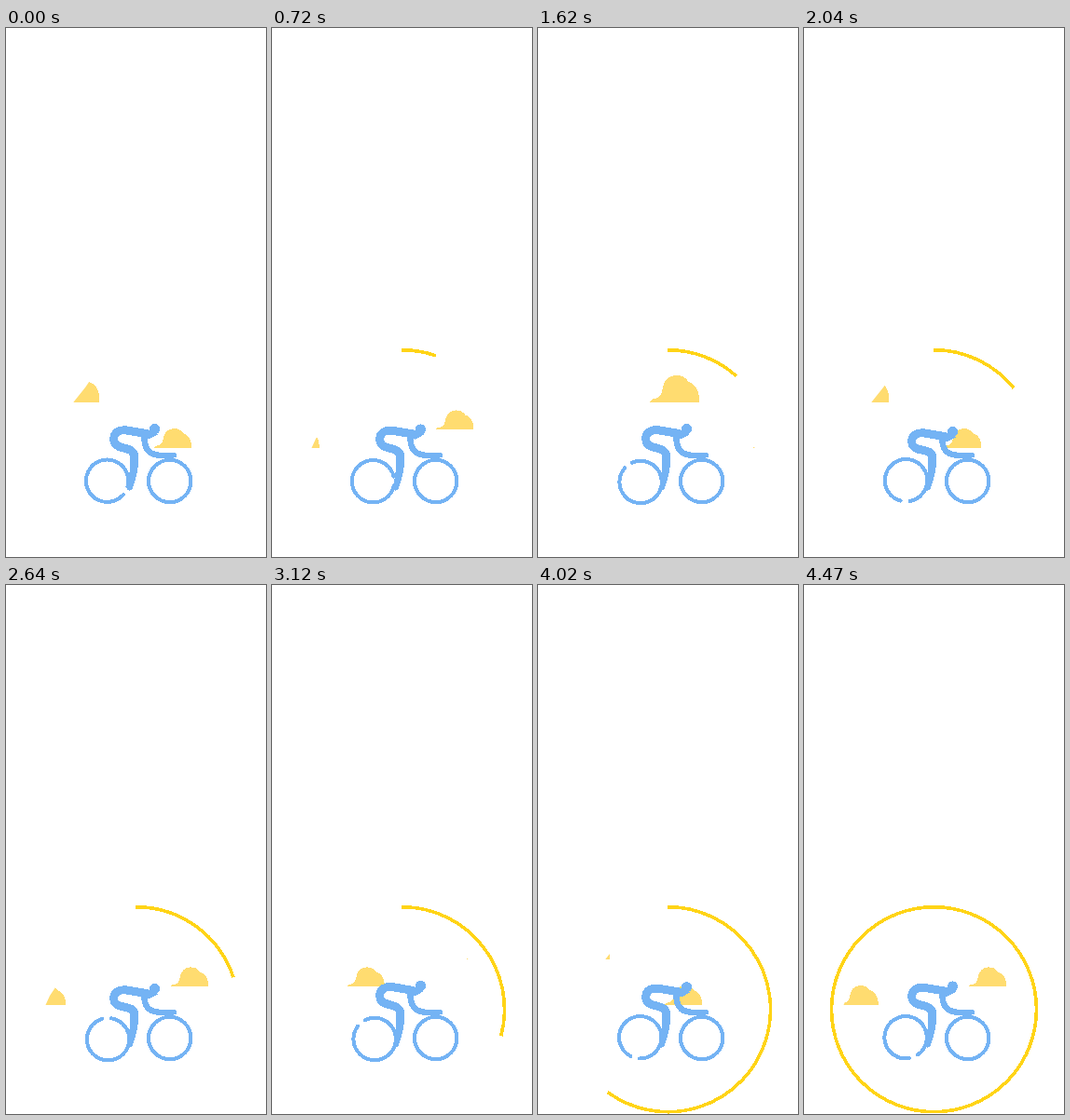
Recreate the animation shown at these times as an HTML page. Size 279x568 px, loop 4500 ms.

```html
<!DOCTYPE html>
<html lang="en">
<head>
<meta charset="utf-8">
<title>Cyclist</title>
<style>
html, body { margin: 0; width: 100%; height: 100%; overflow: hidden; background: #fff; }
svg { display: block; width: 100%; height: 100%; }
</style>
</head>
<body>
<svg viewBox="0 0 279 568" shape-rendering="crispEdges">
  <defs>
    <path id="cloud" d="M0 0Q2-2.600 5-2.700Q9.500-3.600 10.500-9Q12-20.500 22-21Q29-21 32-16Q40-13.500 41-4V0Z"/>
    <clipPath id="sky">
      <path d="M42 452L47 441L53 432L73 401L85 386L96 370H197L210 401L224 432L233 452Z"/>
    </clipPath>
  </defs>
  <g id="clouds" clip-path="url(#sky)" fill="#ffdc70"></g>
  <path id="ring" fill="none" stroke="#ffd416" stroke-width="3.600"/>
  <g fill="none" stroke="#74b3f4" stroke-width="4" stroke-linecap="round" stroke-linejoin="round">
    <circle cx="175.700" cy="486.500" r="22.700"/>
    <path id="wheel"/>
    <path id="torso" stroke-width="9"/>
    <path fill="#74b3f4" stroke="none" d="M133.500 460L142.500 460C142.500 474 139 485 135.500 495Q133 498 130 495.500C131 485 134 474 133.500 460Z"/>
    <path id="arm" stroke-width="6.500"/>
    <path stroke-width="5.400" d="M160 458.300Q168 459.500 180.500 458.800"/>
    <g id="head" fill="#74b3f4" stroke="none">
      <path d="M146 430.500L156 432L163 436L154 441L146 440Z"/>
      <circle cx="159.500" cy="430.300" r="5.600"/>
    </g>
  </g>
</svg>
<script>
const LOOP = 4500, STEPS = 125, SPEED = 7.42;
const $ = id => document.getElementById(id);

// Each row: left edge at its reference step, ground line, scale, passing steps
const rows = [
  { x: 47, y: 401.5, sx: 1.3, sy: 1.36, at: [0, 54.8, 107.9] },
  { x: 176, y: 431.4, sx: 1, sy: 1, at: [19.9, 73, 124] },
  { x: 158, y: 451, sx: 1, sy: 1, at: [0, 54.8, 107.9] }
];

// Ring sweep keys: step, degrees
const sweep = [[0, 0], [20, 19.3], [34, 33.2], [56, 51], [73, 71.7], [76, 75],
  [90, 118], [98, 139.4], [105, 145], [120, 352], [124, 360]];

const clouds = rows.flatMap(row => row.at.map(at => {
  const el = document.createElementNS("http://www.w3.org/2000/svg", "use");
  el.setAttribute("href", "#cloud");
  $("clouds").append(el);
  return { ...row, at, el };
}));

// Monotone cubic interpolation
function curve(keys, t) {
  const last = keys.length - 1;
  if (t >= keys[last][0]) return keys[last][1];
  let i = 0;
  while (t >= keys[i + 1][0]) i++;
  const slope = k => (keys[k + 1][1] - keys[k][1]) / (keys[k + 1][0] - keys[k][0]);
  const tangent = k => {
    if (k === 0) return slope(0);
    if (k === last) return slope(last - 1);
    const a = slope(k - 1), b = slope(k);
    return 2 * a * b / (a + b);
  };
  const [x0, y0] = keys[i], [x1, y1] = keys[i + 1];
  const w = x1 - x0, u = (t - x0) / w, v = 1 - u;
  return y0 * v * v * (1 + 2 * u) + y1 * u * u * (3 - 2 * u)
    + w * u * v * (tangent(i) * v - tangent(i + 1) * u);
}

function arc(cx, cy, r, from, to) {
  const point = deg => {
    const a = deg * Math.PI / 180;
    return (cx + r * Math.cos(a)).toFixed(2) + " " + (cy + r * Math.sin(a)).toFixed(2);
  };
  const mid = (from + to) / 2;
  return `M${point(from)}A${r} ${r} 0 0 1 ${point(mid)}A${r} ${r} 0 0 1 ${point(to)}`;
}

// Five steps per 180 ms, the first one held twice as long
function stepAt(ms) {
  return Math.floor(ms / 180) * 5 + Math.max(0, Math.floor(ms % 180 / 30) - 1);
}

// Hips, shoulders and head dip six times a loop; hand and foot stay put
function drawRider(n) {
  const dip = 1.8 * (1 + Math.cos(2 * Math.PI * (6 * n / STEPS - 0.6)));
  const y = (base, share = 1) => (base + dip * share).toFixed(2);
  $("torso").setAttribute("d", `M151 ${y(435.3)}L129 ${y(431.6)}`
    + `C114 ${y(430)} 112 ${y(445, 0.9)} 121 ${y(449, 0.8)}`
    + `C128 ${y(452, 0.7)} 138 ${y(451, 0.6)} 138 462`);
  $("arm").setAttribute("d", `M148.500 ${y(437)}C148 ${y(450, 0.4)} 152 457.500 163 458.500`);
  $("head").setAttribute("transform", `translate(0 ${dip.toFixed(2)})`);
}

// The rear wheel sits slightly off its axle, away from the gap
function drawWheel(n) {
  const gap = (28 + n * 52.58) % 360, a = gap * Math.PI / 180;
  $("wheel").setAttribute("d",
    arc(109.5 - Math.cos(a), 486.7 - Math.sin(a), 22.7, gap + 12.5, gap + 347.5));
}

function draw(ms) {
  const n = stepAt(ms);
  for (const c of clouds) {
    const x = c.x - (n - c.at) * SPEED;
    c.el.setAttribute("transform", `translate(${x.toFixed(2)} ${c.y}) scale(${c.sx} ${c.sy})`);
  }
  const deg = curve(sweep, n);
  $("ring").setAttribute("d", deg > 0 ? arc(139.5, 455.7, 110, -90, deg - 90) : "");
  drawWheel(n);
  drawRider(n);
}

const start = performance.now();
function tick() {
  draw((performance.now() - start) % LOOP);
  requestAnimationFrame(tick);
}
tick();
</script>
</body>
</html>
```
